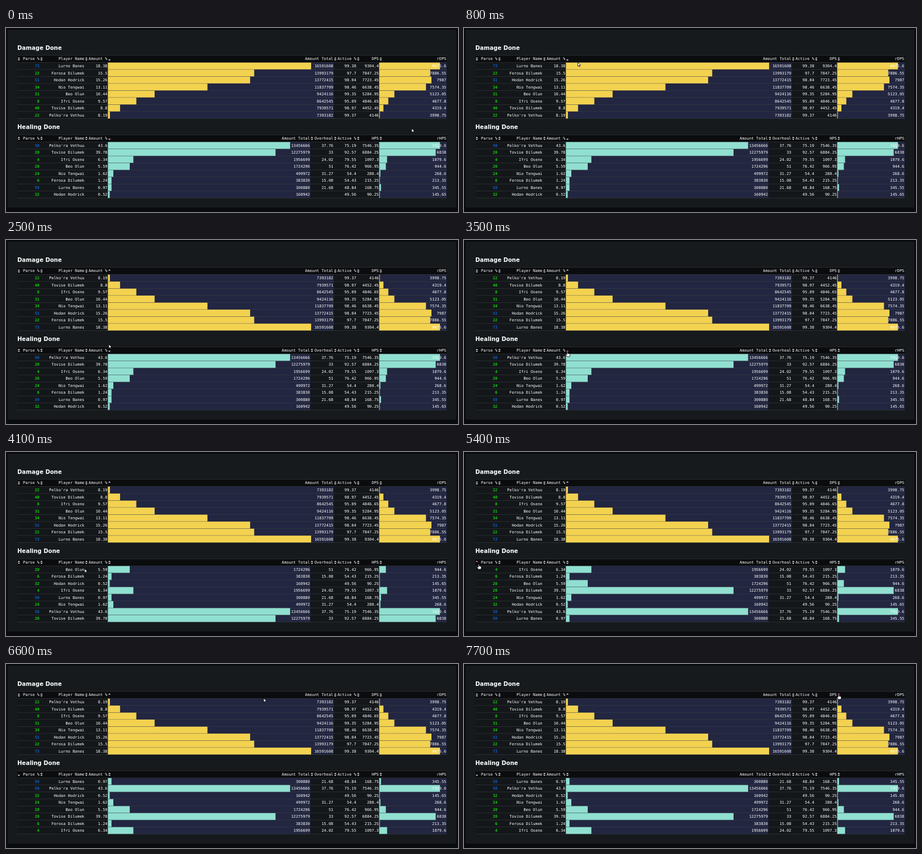
Recreate the animation shown at these times as an HTML page with a canvas. Size 800x328 px, loop 8 s.

```html
<!DOCTYPE html>
<html lang="en">
<head>
<meta charset="utf-8">
<title>Sortable combat tables</title>
<style>
  html, body { margin: 0; width: 100%; height: 100%; overflow: hidden; background: #090a0e; }
  canvas { display: block; width: 800px; height: 328px; }
</style>
</head>
<body>
<canvas id="stage"></canvas>
<script>
const W = 800, H = 328, LOOP = 8000, STEP = 100;
const LEFT = 20, RIGHT = 780, WIDTH = RIGHT - LEFT, ROW = 12.5;
const FIGHT_SECONDS = 1783.2;
const MONO = '6.92px "DejaVu Sans Mono", monospace';
const SANS = 'bold 10px "DejaVu Sans", sans-serif';
const NAMES = ['Beo Olun', 'Ferosa Dilumek', 'Hodan Hodrick', 'Ifri Oseno',
  'Lurno Banes', 'Nio Tengwai', "Pelko'ra Vethuu", 'Tovise Dilumek'];

const canvas = document.getElementById('stage');
const ctx = canvas.getContext('2d');
const dpr = window.devicePixelRatio || 1;
canvas.width = W * dpr;
canvas.height = H * dpr;

// Headings with their left edges
const columns = (rate, ...extra) => [
  ['Parse %', LEFT], ['Player Name', 60], ['Amount %', 139.5], ['Amount Total', 180.3],
  ...extra, ['Active %', 580], [rate, 620.7], ['r' + rate, 660.5]
];

// Share of the group and rate per second follow from each player's total.
function makeRows(groupTotal, stats) {
  return stats.map(([parse, total, ...rest], i) => {
    const adjusted = rest.pop();
    const share = Math.round(total / groupTotal * 1e4) / 100;
    const rate = Math.round(total / FIGHT_SECONDS * 20) / 20;
    return [parse, NAMES[i], share, total, ...rest, rate, adjusted];
  });
}

// Sorts are [time, column, direction]; direction 0 keeps the name order.
const damage = {
  title: 'Damage Done', top: 49, color: '#f3d250',
  cols: columns('DPS'),
  rows: makeRows(90.27e6, [
    [31, 9424116, 99.35, 5123.05],
    [22, 13993179, 97.7, 7886.55],
    [51, 13772415, 98.04, 7987],
    [8, 8642545, 95.09, 4677.8],
    [73, 16591608, 99.38, 8675.6],
    [34, 11837709, 98.46, 7574.35],
    [22, 7393182, 99.37, 3998.75],
    [40, 7939571, 98.97, 4319.4]
  ]),
  sorts: [[0, 3, -1], [1300, 3, 0], [1800, 3, 1]]
};
const healing = {
  title: 'Healing Done', top: 190.6, color: '#90dfd0',
  cols: columns('HPS', ['Overheal', 538.7]),
  rows: makeRows(30.862e6, [
    [20, 1724296, 51, 76.42, 944.6],
    [6, 383830, 15.08, 54.43, 213.35],
    [32, 160942, '', 49.56, 145.65],
    [4, 1956699, 24.02, 79.55, 1079.6],
    [59, 300880, 21.68, 48.84, 345.55],
    [24, 499972, 31.27, 54.4, 268.6],
    [50, 13456666, 37.76, 75.19, 7419.6],
    [20, 12275979, 33, 92.57, 6838]
  ]),
  sorts: [[0, 3, -1], [3700, 3, 0], [5400, 0, 1], [5800, 0, -1]]
};
const tables = [damage, healing];

// Pointer stops: time, x, y
const PATH = [
  [0, 718, 179], [900, 183, 57], [2200, 183, 57], [2500, 182, 186], [2800, 139, 206],
  [3200, 181, 216], [3500, 183, 199], [3850, 183, 199], [4100, 139, 208],
  [4900, 26, 200], [6300, 26, 200], [6600, 456, 61], [6800, 590, 40],
  [7000, 661, 50], [7200, 626, 57], [7700, 663, 54], [LOOP, 663, 54]
];

function pointerAt(t) {
  const i = PATH.findIndex(p => p[0] > t);
  const [t0, x0, y0] = PATH[i - 1], [t1, x1, y1] = PATH[i];
  const k = (t - t0) / (t1 - t0), e = k * k * (3 - 2 * k);
  return { x: x0 + (x1 - x0) * e, y: y0 + (y1 - y0) * e };
}

function rect(x, y, w, h, color) {
  ctx.fillStyle = color;
  ctx.fillRect(x, y, w, h);
}

function text(s, x, y, color = '#fff', font = MONO, align = 'right') {
  ctx.font = font;
  ctx.textAlign = align;
  ctx.fillStyle = color;
  ctx.fillText(s, x, y);
}

function triangle(x, y, dir) {
  ctx.beginPath();
  ctx.moveTo(x - 2.2, y);
  ctx.lineTo(x + 2.2, y);
  ctx.lineTo(x, y - dir * 2.2);
  ctx.fill();
}

function sortIcon(x, y, dir, hot) {
  ctx.fillStyle = hot ? '#ff69b4' : '#dcdcdc';
  if (dir >= 0) triangle(x, y - 0.7, 1);
  if (dir <= 0) triangle(x, y + 0.9, -1);
}

// Bars grow in hundredths of the value range and fill at most 90% of the cell.
function barShare(rows, col, value) {
  const all = rows.map(r => r[col]);
  const lo = Math.min(...all), hi = Math.max(...all);
  return 0.009 * Math.min(100, Math.floor((value - lo) / (hi - lo) * 100) + 1);
}

function drawTable({ title, top, color, cols, rows: players, sorts }, t, mouse) {
  const [, key, dir] = sorts.filter(s => s[0] <= t).pop();
  const rows = dir ? [...players].sort((a, b) => dir * (a[key] - b[key])) : players;
  const end = c => c + 1 < cols.length ? cols[c + 1][1] : RIGHT;
  const rowTop = i => top + ROW * (i + 1);
  let hover = false;

  text(title, LEFT, top - 10.5, '#fff', SANS, 'left');
  rect(LEFT, top, WIDTH, ROW, '#0b0c0e');
  rect(LEFT, rowTop(0), WIDTH, ROW * rows.length, '#14171a');
  for (const c of [3, cols.length - 1]) {
    const x = cols[c][1], w = end(c) - x;
    rect(x, rowTop(0), w, ROW * rows.length, '#222640');
    rows.forEach((r, i) => rect(x, rowTop(i), w * barShare(rows, c, r[c]), ROW, color));
  }
  for (let i = -1; i <= rows.length; i++) rect(LEFT, rowTop(i) - 0.3, WIDTH, 0.45, '#44474a');

  cols.forEach(([name, x], c) => {
    const ix = x + 2.8, iy = top + 6.1, textX = end(c) - 0.8;
    const hot = Math.abs(mouse.x - ix) < 4 && Math.abs(mouse.y - iy) < 5.5;
    hover = hover || hot;
    sortIcon(ix, iy, c === key ? dir : 0, hot);
    text(name, textX, top + 8.4);
    rows.forEach((r, i) => {
      const ink = c ? '#fff' : r[0] < 50 ? '#14d00e' : '#0b60cc';
      text(r[c], textX, rowTop(i) + 8.8, ink, c ? MONO : 'bold ' + MONO);
    });
  });
  return hover;
}

const ARROW = new Path2D('M0 0V7.1L1.7 5.6L2.8 8L4 7.5L2.9 5.1H5.1Z');
const HAND = new Path2D('M-.8 .6Q0-.6 .8 .6V3.2L4 3.9Q4.8 4.2 4.7 5.2L4.1 9H-.6L-3 5.6Q-3.1 4.4-2 4.7L-.8 5.6Z');

function drawPointer({ x, y }, shape) {
  ctx.save();
  ctx.translate(x, y);
  ctx.lineWidth = 0.8;
  ctx.strokeStyle = '#000';
  ctx.fillStyle = '#fff';
  ctx.fill(shape);
  ctx.stroke(shape);
  ctx.restore();
}

function draw(now) {
  const t = Math.floor(now % LOOP / STEP) * STEP;
  const mouse = pointerAt(t);
  ctx.setTransform(dpr, 0, 0, dpr, 0, 0);
  rect(0, 0, W, H, '#090a0e');
  rect(3, 3, 794, 317, '#161a1d');
  const hits = tables.map(table => drawTable(table, t, mouse));
  drawPointer(mouse, hits.includes(true) ? HAND : ARROW);
}

let start;
function tick(now) {
  if (start === undefined) start = now;
  draw(Math.max(0, now - start));
  requestAnimationFrame(tick);
}
requestAnimationFrame(tick);
</script>
</body>
</html>
```
